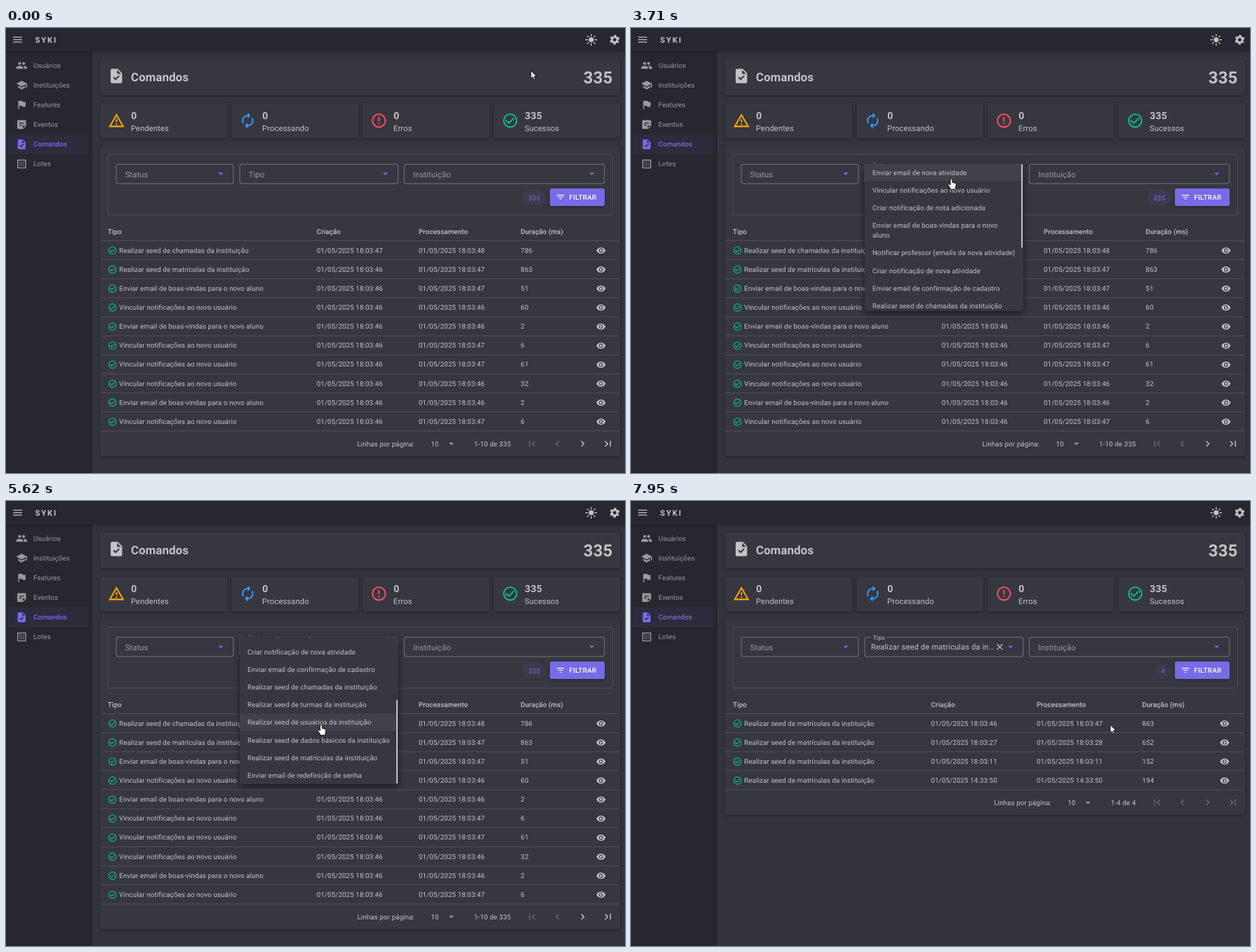
An HTML page that plays this animation: 882 by 635 pixels, repeating every 7990 ms.

```html
<!DOCTYPE html>
<html lang="pt-BR">
<head>
<meta charset="utf-8">
<style>
html, body { margin: 0; width: 100%; height: 100%; overflow: hidden; background: #32333d; }
svg { display: block; font-family: Roboto, Arial, sans-serif; }
text { letter-spacing: .01em; text-rendering: geometricPrecision; white-space: pre; }
.card { fill: #373740; filter: drop-shadow(0 1px 1.5px #0006); }
.line { fill: none; stroke: #fff; stroke-opacity: .15; stroke-width: .8; }
.box { fill: none; stroke: #fff; stroke-opacity: .34; stroke-width: .9; }
</style>
</head>
<body>
<svg id="stage" width="882" height="635" viewBox="0 0 882 635"></svg>
<script>
const TEXT = '#c3c3c6', MUTED = '#99999e', OFF = '#6b6b73', PRIMARY = '#776be7', GREEN = '#0bba83';
const ring = '<circle cx="12" cy="12" r="9" fill="none" stroke="currentColor" stroke-width="2"/>';
const path = d => `<path fill-rule="evenodd" d="${d}"/>`;
const icons = {
  menu: path('M3 18h18v-2H3zM3 13h18v-2H3zM3 6v2h18V6z'),
  sun: '<circle cx="12" cy="12" r="5"/><path d="M12 1v3.5M12 19.5V23M1 12h3.5M19.5 12H23M4.3 4.3l2 2M17.7 17.7l2 2M4.3 19.7l2-2M17.7 6.3l2-2" stroke="currentColor" stroke-width="2" stroke-linecap="round"/>',
  gear: '<g fill="none" stroke="currentColor"><circle cx="12" cy="12" r="5.5" stroke-width="4"/><circle cx="12" cy="12" r="8.3" stroke-width="3.2" stroke-dasharray="4.7 3.992" stroke-dashoffset="2.35" transform="rotate(30 12 12)"/></g>',
  people: path('M16 11c1.66 0 2.99-1.34 2.99-3S17.66 5 16 5s-3 1.34-3 3 1.34 3 3 3zM8 11c1.66 0 2.99-1.34 2.99-3S9.66 5 8 5 5 6.34 5 8s1.34 3 3 3zM8 13c-2.33 0-7 1.17-7 3.5V19h14v-2.5C15 14.17 10.33 13 8 13zM16 13l-.97.05C16.2 13.9 17 15 17 16.5V19h6v-2.5c0-2.33-4.67-3.5-7-3.5z'),
  school: path('M5 13.18v4L12 21l7-3.82v-4L12 17zM12 3L1 9l11 6 9-4.91V17h2V9z'),
  flag: path('M14.4 6L14 4H5v17h2v-7h5.6l.4 2h7V6z'),
  note: path('M19 3H5c-1.1 0-2 .9-2 2v14c0 1.1.9 2 2 2h10l6-6V5c0-1.1-.9-2-2-2zM7 8h10v2H7zM12 14H7v-2h5zM14 19.5V14h5.5z'),
  task: path('M14 2H6c-1.1 0-2 .9-2 2v16c0 1.1.9 2 2 2h12c1.1 0 2-.9 2-2V8zM10.94 18L7.4 14.46l1.41-1.41 2.12 2.12 4.24-4.24 1.41 1.41zM13 9V3.5L18.5 9z'),
  grid: '<path d="M4 4h16v16H4z" fill="none" stroke="currentColor" stroke-width="2"/><path d="M7.5 8.5h10M7.5 12h10M7.5 15.5h10" stroke="currentColor" stroke-width="1.8" stroke-dasharray="1.8 1.8"/>',
  warning: path('M12 5.99L19.53 19H4.47zM12 2L1 21h22zM13 16h-2v2h2zM13 10h-2v4h2z').replace('evenodd', 'nonzero').replace('M12 2L1 21h22z', 'M12 2L23 21H1z').replace('M12 5.99L19.53 19H4.47z', 'M12 5.99L4.47 19H19.53z'),
  sync: path('M12 6v3l4-4-4-4v3c-4.42 0-8 3.58-8 8 0 1.57.46 3.03 1.24 4.26L6.7 14.8c-.45-.83-.7-1.79-.7-2.8 0-3.31 2.69-6 6-6zM18.76 7.74L17.3 9.2c.44.84.7 1.79.7 2.8 0 3.31-2.69 6-6 6v-3l-4 4 4 4v-3c4.42 0 8-3.58 8-8 0-1.57-.46-3.03-1.24-4.26z'),
  error: ring + path('M11 15h2v2h-2zM11 7h2v6h-2z'),
  check: ring + path('M16.59 7.58L10 14.17l-3.59-3.58L5 12l5 5 8-8z'),
  eye: path('M12 4.5C7 4.5 2.73 7.61 1 12c1.73 4.39 6 7.5 11 7.5s9.27-3.11 11-7.5c-1.73-4.39-6-7.5-11-7.5zM12 17a5 5 0 1 1 0-10a5 5 0 1 1 0 10zM12 9a3 3 0 1 0 0 6a3 3 0 1 0 0-6z'),
  filter: path('M10 18h4v-2h-4zM3 6v2h18V6zM6 13h12v-2H6z'),
  down: path('M7 10l5 5 5-5z'),
  first: path('M18.41 16.59L13.82 12l4.59-4.59L17 6l-6 6 6 6zM6 6h2v12H6z'),
  prev: path('M15.41 7.41L14 6l-6 6 6 6 1.41-1.41L10.83 12z'),
  next: path('M10 6L8.59 7.41 13.17 12l-4.58 4.59L10 18l6-6z'),
  last: path('M5.59 7.41L10.18 12l-4.59 4.59L7 18l6-6-6-6zM16 6h2v12h-2z'),
  close: path('M19 6.41L17.59 5 12 10.59 6.41 5 5 6.41 10.59 12 5 17.59 6.41 19 12 13.41 17.59 19 19 17.59 13.41 12z')
};

// cx, cy are the centre of the icon
const icon = (name, cx, cy, size = 16.8, color = TEXT) =>
  `<g transform="translate(${cx - size / 2} ${cy - size / 2}) scale(${size / 24})" fill="${color}" color="${color}">${icons[name]}</g>`;
// cy is the middle of the capitals
const text = (s, x, cy, size = 9.8, color = TEXT, weight = 400, extra = '') =>
  `<text x="${x}" y="${cy + size * .36}" font-size="${size}" fill="${color}" font-weight="${weight}" ${extra}>${s}</text>`;
const rect = (x, y, x2, y2, attrs, r = 2.8) =>
  `<rect x="${x}" y="${y}" width="${x2 - x}" height="${y2 - y}" rx="${r}" ${attrs}/>`;
const card = (x, y, x2, y2) => rect(x, y, x2, y2, 'class="card"');

const seed = s => `Realizar seed de ${s} da instituição`;
const welcome = 'Enviar email de boas-vindas para o novo aluno';
const link = 'Vincular notificações ao novo usuário';
const at = s => '01/05/2025 ' + s;
const recent = [[seed('chamadas'), 47, 48, 786], [seed('matrículas'), 46, 47, 863], [welcome, 46, 47, 51],
  [link, 46, 46, 60], [welcome, 46, 46, 2], [link, 46, 47, 6], [link, 46, 47, 61], [link, 46, 46, 32],
  [welcome, 46, 46, 2], [link, 46, 47, 6]].map(([s, a, b, ms]) => [s, at('18:03:' + a), at('18:03:' + b), ms]);
const filtered = [['18:03:46', '18:03:47', 863], ['18:03:27', '18:03:28', 652], ['18:03:11', '18:03:11', 152],
  ['14:33:50', '14:33:50', 194]].map(([a, b, ms]) => [seed('matrículas'), at(a), at(b), ms]);

function table(id, rows, cols, eyeX, pagerX, range, more) {
  const step = 27.15, end = 303.5 + rows.length * step, y = end + 18.2;
  let s = `<g id="${id}">` + card(134, 169, 875, end + 36);
  ['Tipo', 'Criação', 'Processamento', 'Duração (ms)'].forEach((h, i) => s += text(h, cols[i], 290.5, 9.8, TEXT, 500));
  for (let i = 0; i <= rows.length; i++) s += `<path class="line" d="M134 ${303.5 + i * step}H875"/>`;
  rows.forEach((row, i) => {
    const cy = 317 + i * step;
    s += icon('check', 151.7, cy + .5, 14, GREEN) + icon('eye', eyeX, cy + .5, 14);
    row.forEach((v, c) => s += text(v, c ? cols[c] : 161.3, cy));
  });
  s += text('Linhas por página:', pagerX, y) + text('10', pagerX + 105, y) + icon('down', pagerX + 134, y, 16.8, MUTED) +
    text(range, pagerX + 166.5, y);
  ['first', 'prev', 'next', 'last'].forEach((n, i) => s += icon(n, 749.7 + i * 36, y, 16.8, more && i > 1 ? TEXT : OFF));
  return s + '</g>';
}

function select(x, x2, label, id) {
  const name = text(label, 0, 0, 11.2, 'currentColor');
  return rect(x, 194.3, x2, 222, 'class="box"') + icon('down', x2 - 18, 208, 16.8, PRIMARY) +
    `<g ${id ? `id="${id}"` : ''} color="${MUTED}" transform="translate(${x + 12.7} 209.2)">${name}</g>`;
}

const options = ['Enviar email de nova atividade', link, 'Criar notificação de nota adicionada',
  'Enviar email de boas-vindas para o novo|aluno', 'Notificar professor (emails da nova atividade)',
  'Criar notificação de nova atividade', 'Enviar email de confirmação de cadastro', seed('chamadas'), seed('turmas'),
  seed('usuários'), seed('dados básicos'), seed('matrículas'), 'Enviar email de redefinição de senha'];
const tops = [];
let listY = 193.4;
const optionText = options.map(o => {
  const lines = o.split('|'), top = listY;
  tops.push(top);
  listY += 11.2 + 14 * lines.length;
  return lines.map((l, i) => text(l, 344, top + 12.6 + 14 * i)).join('');
}).join('');

const nav = [['people', 'Usuários'], ['school', 'Instituições'], ['flag', 'Features'], ['note', 'Eventos'],
  ['task', 'Comandos'], ['grid', 'Lotes']];
const stats = [['warning', '#ffa800', 0, 'Pendentes'], ['sync', '#3299ff', 0, 'Processando'],
  ['error', '#f64e62', 0, 'Erros'], ['check', GREEN, 335, 'Sucessos']];

stage.innerHTML =
  rect(0, 0, 882, 635, 'fill="#32333d"', 0) + rect(0, 0, 123, 635, 'fill="#27272f"', 0) +
  rect(0, 0, 882, 33, 'fill="#27272f" style="filter:drop-shadow(0 1px 2px #0005)"', 0) +
  icon('menu', 16.6, 16.6) + text('SYKI', 41.5, 16.8, 11.2, TEXT, 700, 'style="letter-spacing:1.9px"') +
  icon('sun', 833.8, 16.8) + icon('gear', 867.3, 16.8) +
  rect(2, 152, 117, 180, 'fill="#776be7" fill-opacity=".08"') +
  nav.map(([n, s], i) => {
    const y = 53 + i * 28.15, on = i == 4, color = on ? PRIMARY : MUTED;
    return icon(n, 22.3, y + .3, 16.8, color) + text(s, 39, y, 9.8, color, on ? 500 : 400);
  }).join('') +
  card(134, 44.5, 875, 96) + icon('task', 157.3, 68.5, 24.5) + text('Comandos', 178, 69.5, 16.8, TEXT, 700) +
  text('335', 864.5, 70, 23.8, TEXT, 700, 'text-anchor="end"') +
  stats.map(([n, color, count, s], i) => {
    const x = 134 + i * 187;
    return card(x, 108, x + 181 - (i == 3), 157.5) + icon(n, x + 23.4, 132.2, 24.5, color) +
      text(count, x + 44.3, 124.5, 14, TEXT, 700) + text(s, x + 44, 143, 11.2);
  }).join('') +
  table('all', recent, [145, 442.7, 588, 733.3], 847.8, 500.5, '1-10 de 335', true) +
  table('few', filtered, [145, 427.6, 578, 728.3], 845.8, 517.2, '1-4 de 4', false) +
  rect(145, 180.3, 864.3, 267, 'class="line"') +
  select(157, 324, 'Status') + select(567.5, 852.7, 'Instituição') + select(333, 558.7, '') +
  rect(342, 193, 365, 196, 'id="notch" fill="#373740"', 0) +
  `<g id="label">${text('Tipo', 0, 0, 11.2, 'currentColor')}</g>` +
  `<g id="value">${text('Realizar seed de matrículas da in…', 342, 208.2, 11.2)}${icon('close', 525.5, 208.2, 15)}</g>` +
  rect(0, 231, 769, 252.5, 'id="chip" fill="#776be7" fill-opacity=".08"', 10.7) +
  text('', 0, 242.3, 9.8, PRIMARY, 400, 'id="total" text-anchor="middle"') +
  rect(775, 229, 853, 254, 'id="button" style="filter:drop-shadow(0 1.5px 1.5px #0006)"') +
  icon('filter', 790, 241.5, 14, '#fff') + text('FILTRAR', 802.3, 241.3, 9.8, '#fff', 500, 'style="letter-spacing:.28px"') +
  `<clipPath id="clip"><rect x="333" y="194" width="226" height="210" rx="2.8"/></clipPath>
  <g id="popover">${rect(333, 194, 559, 404, 'fill="#373740" style="filter:drop-shadow(0 3px 4px #0008)"')}
  <g clip-path="url(#clip)"><g id="list"><rect id="hover" x="333" width="224" height="25.2" fill="#fff" fill-opacity=".05"/>${optionText}</g></g>
  <rect id="thumb" x="556.2" width="1.8" height="119" fill="#d0d0d2"/></g>
  <g fill="#fff" stroke="#000" stroke-width=".8" stroke-linejoin="round">
  <path id="arrow" d="M0 0V11.2L2.6 8.8 4.3 12.8 6.1 12 4.4 8.1H7.9Z"/>
  <path id="hand" d="M-1.4.9Q0-1 1.4.9V5L5.2 5.8Q7 6.3 6.8 8.5L5.8 12V14.6H-1.6V12.6L-4.6 8.4Q-4.7 6.5-3 7.2L-1.4 8.5Z"/></g>`;

const byId = id => document.getElementById(id);
const el = Object.fromEntries(['all', 'few', 'notch', 'label', 'value', 'chip', 'total', 'button', 'popover', 'list',
  'hover', 'thumb', 'arrow', 'hand'].map(id => [id, byId(id)]));
const set = (id, attrs) => { for (const k in attrs) el[id].setAttribute(k, attrs[k]); };
const show = (id, on) => el[id].style.display = on ? '' : 'none';
const ramp = (t, a, b) => Math.min(1, Math.max(0, (t - a) / (b - a)));
const ease = p => p * p * (3 - 2 * p);
const mix = (a, b, p) => a + (b - a) * p;

// time, x, y of the pointer tip
const route = [[0, 748, 61], [50, 748, 61], [200, 846, 63], [410, 846, 64], [970, 236, 129], [1180, 236, 129],
  [1460, 439, 125], [1710, 439, 125], [2030, 599, 136], [2240, 599, 136], [2540, 794, 135], [2700, 794, 135],
  [3200, 460, 208], [3510, 458, 210], [3710, 456.5, 215.5], [3850, 456, 217], [4320, 452, 242], [5180, 451, 242],
  [5620, 449, 319.5], [5950, 448, 348], [5990, 448, 348], [6150, 448, 366], [6400, 448, 366], [7140, 797, 238],
  [7260, 799, 239], [7300, 800.5, 239.5], [7500, 800.5, 240], [7950, 683, 319.5], [7990, 683, 319.5]];

function draw(t) {
  const i = route.findIndex(k => k[0] > t), [t0, x0, y0] = route[i - 1], [t1, x1, y1] = route[i];
  const p = ease(ramp(t, t0, t1)), x = mix(x0, x1, p), y = mix(y0, y1, p);

  const open = t >= 3330 && t < 6430, chosen = t >= 6430, done = t >= 7600;
  const scroll = 131 * ease(ramp(t, 3850, 4320));
  set('popover', { opacity: ramp(t, 3330, 3500) * (1 - ramp(t, 6430, 6600)) });
  set('list', { transform: `translate(0 ${-scroll})` });
  set('thumb', { y: 194.5 + 89.5 * scroll / 131 });
  const item = tops.filter(v => v <= y + scroll).length - 1;
  set('hover', { y: tops[item < 0 ? 0 : item] });
  show('hover', item >= 0 && (t < 3850 || t >= 4480));

  const float = ease(ramp(t, 3330, 3530));
  set('label', {
    transform: `translate(${mix(345.7, 345, float)} ${mix(209.2, 195, float)}) scale(${mix(1, .75, float)})`,
    color: open ? PRIMARY : chosen ? TEXT : MUTED
  });
  show('notch', float > .5);
  show('value', chosen);

  show('all', !done);
  show('few', done);
  set('chip', { x: done ? 746.7 : 736, width: done ? 22.3 : 33 });
  set('total', { x: done ? 758 : 752.6 });
  el.total.textContent = done ? '4' : '335';

  const onButton = x > 775 && x < 853 && y > 229 && y < 254;
  const onSelect = x > 333 && x < 559 && y > 194 && y < 222;
  set('button', { fill: onButton ? '#594ae2' : PRIMARY });
  const hand = open || onButton || onSelect;
  show('hand', hand);
  show('arrow', !hand);
  set(hand ? 'hand' : 'arrow', { transform: `translate(${x} ${y})` });
}

function frame() {
  draw(performance.now() % 7990);
  requestAnimationFrame(frame);
}
frame();
</script>
</body>
</html>
```
